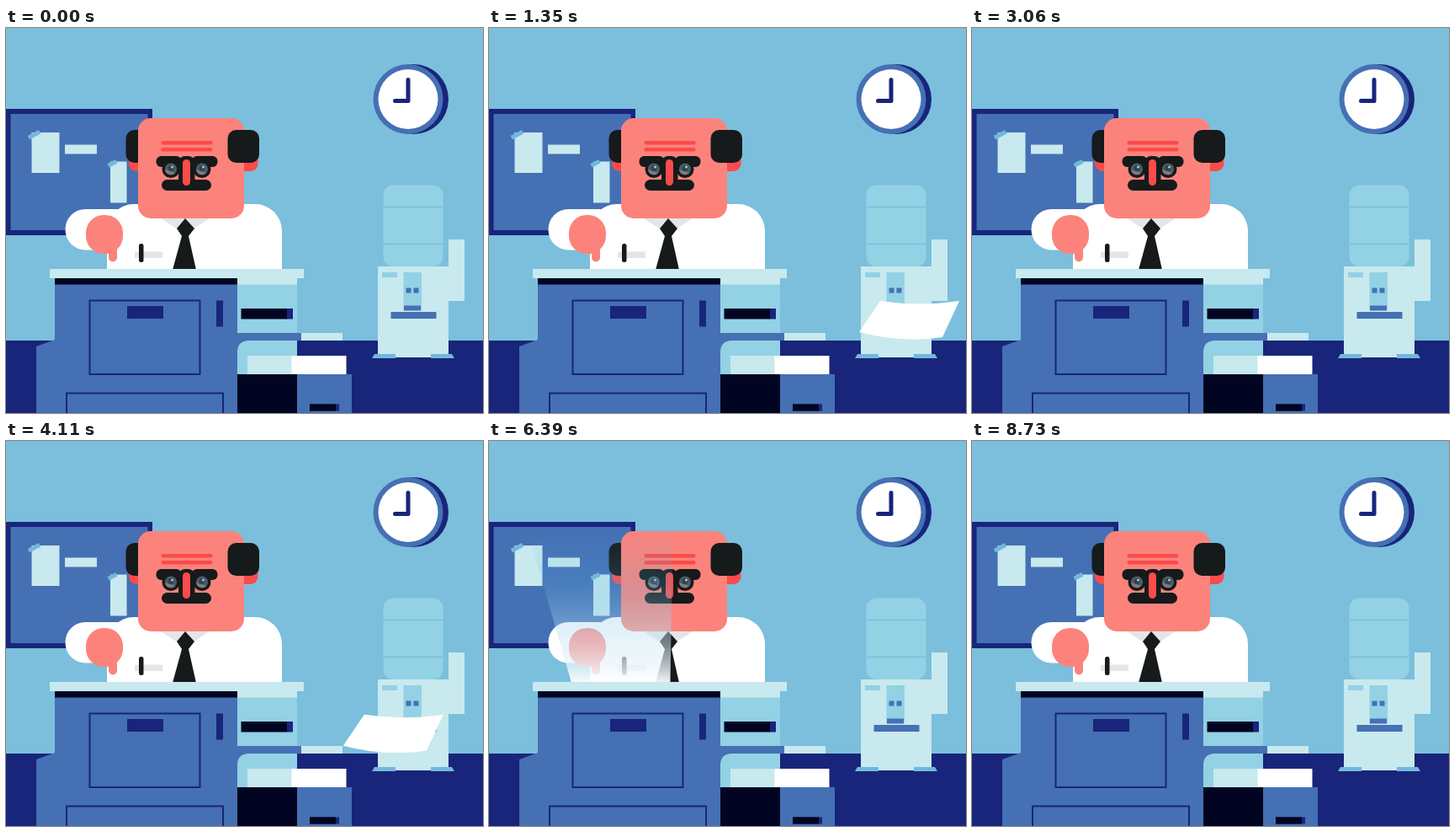
Animation of 567 by 457 pixels, one loop 8.97 s. Source, as an HTML page:

```html
<!DOCTYPE html>
<html lang="en">
<head>
<meta charset="utf-8">
<title>Copier</title>
<style>
  html, body { margin: 0; width: 100%; height: 100%; overflow: hidden; background: #7bbfdc; }
  svg { display: block; width: 100vw; height: 100vh; }
  .navy { fill: #18257a; }
  .blue { fill: #4570b4; }
  .sky { fill: #93d1e5; }
  .ice { fill: #c8e9ee; }
  .ink { fill: #161a1b; }
  .dark { fill: #020522; }
  .skin { fill: #fb837b; }
  .red { fill: #fb4b4b; }
  .tape { fill: #72b8dc; }
  .white { fill: #fff; }
  .line { fill: none; stroke: #18257a; stroke-width: 2; }
  .hands { fill: none; stroke: #18257a; stroke-width: 5; stroke-linecap: round; stroke-linejoin: round; }
</style>
</head>
<body>
<svg viewBox="0 0 567 457" preserveAspectRatio="none">
  <defs>
    <linearGradient id="glow" gradientUnits="userSpaceOnUse" x1="0" y1="55" x2="0" y2="287">
      <stop offset=".2" stop-color="#4fb0e0" stop-opacity="0"/>
      <stop offset=".5" stop-color="#5cb4e2" stop-opacity=".2"/>
      <stop offset=".8" stop-color="#d5eaf6" stop-opacity=".5"/>
      <stop offset="1" stop-color="#fff" stop-opacity=".95"/>
    </linearGradient>
    <clipPath id="slot"><rect x="351" width="216" height="457"/></clipPath>
  </defs>

  <rect width="567" height="457" fill="#7bbfdc"/>
  <rect class="navy" y="371" width="567" height="86"/>

  <!-- notice board -->
  <rect class="navy" y="96" width="174" height="150"/>
  <rect class="blue" x="5.5" y="102" width="163" height="138"/>
  <g class="ice">
    <rect x="30.500" y="124" width="33" height="48"/>
    <rect x="70" y="138.500" width="38" height="11"/>
    <rect x="124" y="158.500" width="19.500" height="49"/>
  </g>
  <g class="tape">
    <rect x="26" y="124.500" width="15" height="5" transform="rotate(-28 33 127)"/>
    <rect x="121" y="158.500" width="11" height="5" transform="rotate(-28 126 161)"/>
  </g>

  <!-- clock -->
  <rect class="navy" x="443.500" y="43" width="82.500" height="83" rx="41.500"/>
  <circle class="blue" cx="478" cy="84.500" r="41.500"/>
  <circle class="white" cx="478" cy="84.500" r="35.500"/>
  <path class="hands" d="M462.500 86.500H478V61.500"/>

  <!-- water cooler -->
  <rect class="sky" x="448.500" y="186.500" width="71" height="96.500" rx="12"/>
  <path d="M449 212.500h70M449 256.500h70" stroke="#7bbfdc" stroke-width="1.500"/>
  <path class="ice" d="M442 283h84v-32h19v73h-19v67h-84z"/>
  <path class="sky" d="M447 290h18v6h-18zM472.500 290h21.500v45h-21.500z"/>
  <path class="blue" d="M475.500 308.500h6v6h-6zM484.500 308.500h6v6h-6zM457.500 337h54v8h-54z"/>
  <rect class="blue" x="473" y="329.500" width="20" height="6"/>
  <path class="tape" d="M438 387h25v5h-28zM505 387h25l3 5h-28z"/>

  <!-- clerk -->
  <rect class="white" x="120" y="209" width="208" height="110" rx="32"/>
  <path d="M184 226h58l-20 13-9 2-9-2z" fill="#e5e5e8"/>
  <path class="ink" d="M213 226l11 12-7 9 9 40h-28l11-40-6-9z"/>
  <rect x="153" y="265.500" width="33" height="7.500" fill="#e5e5e8"/>
  <rect class="ink" x="158" y="256" width="5.500" height="22" rx="2.500"/>
  <rect class="red" x="146" y="148" width="30" height="22" rx="9"/>
  <rect class="red" x="270" y="148" width="29.500" height="22" rx="9"/>
  <rect class="ink" x="142.500" y="121" width="36" height="39" rx="10"/>
  <rect class="skin" x="157" y="107" width="126" height="119" rx="15"/>
  <rect class="ink" x="263.500" y="121" width="37.500" height="39" rx="10"/>
  <g class="red">
    <rect x="184.500" y="134" width="61" height="4.500" rx="2"/>
    <rect x="184.500" y="142" width="61" height="4.500" rx="2"/>
  </g>
  <g class="ink">
    <rect x="178.500" y="152" width="30" height="13" rx="6"/>
    <rect x="221" y="152" width="30.500" height="13" rx="6"/>
    <rect x="205" y="152" width="19.500" height="38" rx="8"/>
    <circle cx="196" cy="167.500" r="10.500"/>
    <circle cx="233" cy="167.500" r="10.500"/>
    <rect x="185" y="180" width="59" height="13" rx="6.500"/>
  </g>
  <g id="eye">
    <circle cx="196" cy="167.500" r="7" fill="#4b5d69"/>
    <path d="M189 168a7 7 0 0 0 12 4z" fill="#837a80"/>
    <circle cx="196" cy="166.500" r="3.500" fill="#33434d"/>
    <circle cx="197.500" cy="165" r="1.500" fill="#a9c8d5"/>
  </g>
  <use href="#eye" x="37"/>
  <rect class="red" x="210" y="156" width="9" height="31" rx="4.500"/>
  <rect class="white" x="70.500" y="215" width="85" height="48.500" rx="24"/>
  <rect class="skin" x="95" y="222" width="44" height="46" rx="21"/>
  <rect class="skin" x="122" y="250" width="10" height="27.500" rx="5"/>

  <path id="beam" fill="url(#glow)"/>

  <!-- copier -->
  <rect class="sky" x="275" y="297" width="71" height="114"/>
  <path class="blue" d="M36 457v-79l22-8v-73h217v65h76v9h-62q-14 0-14 14v72z"/>
  <rect class="dark" x="58" y="297" width="217" height="7.500"/>
  <rect class="ice" x="275" y="297" width="71" height="7.500"/>
  <rect class="ice" x="52" y="286" width="302" height="11"/>
  <rect class="line" x="99.500" y="323.500" width="131" height="87.500"/>
  <rect class="line" x="72" y="433.500" width="186" height="40"/>
  <path class="navy" d="M144 330h43v15h-43zM250 323.500h8v31h-8zM333 333h8v12.500h-8z"/>
  <rect class="dark" x="279.500" y="333" width="54.500" height="12.500"/>
  <rect class="ice" x="351" y="362" width="49" height="9"/>
  <rect class="ice" x="287" y="389" width="53" height="22"/>
  <rect class="white" x="339.500" y="389" width="65" height="22"/>
  <rect class="dark" x="275" y="411" width="71" height="46"/>
  <rect class="blue" x="346" y="411" width="65" height="46"/>
  <rect class="navy" x="361" y="446.500" width="35" height="8"/>
  <rect class="dark" x="361" y="446.500" width="31" height="8"/>

  <path id="sheet" class="white" d="M-36-20Q11-13 58-20L38 23Q-12 30-61 17z"/>
</svg>
<script>
const LOOP = 8970, CYCLE = 2850, COPIES = 3, EXIT = 1000, FREE = 1260;
const beam = document.getElementById('beam');
const sheet = document.getElementById('sheet');

// the sheet's centre where its swing turns round
const turns = [
  { t: EXIT, x: 308, y: 350 },
  { t: 1375, x: 503, y: 344 },
  { t: 2070, x: 354, y: 391 },
  { t: 2700, x: 478, y: 463 },
  { t: 3030, x: 450, y: 480 }
];

const clamp = (v, lo, hi) => Math.max(lo, Math.min(hi, v));
const ramp = (t, a, b) => clamp((t - a) / (b - a), 0, 1);
const mix = (a, b, u) => a + (b - a) * u;
const easeOut = u => Math.sin(u * Math.PI / 2);
const easeInOut = u => (1 - Math.cos(u * Math.PI)) / 2;
const copyIndex = t => clamp(Math.floor(t / CYCLE), 0, COPIES - 1);

function drawBeam(t) {
  const left = ramp(t, 830, 1240), right = ramp(t, 400, 950);
  const low = u => mix(98, 320, u), high = u => mix(31, 387, u);
  beam.setAttribute('d', right > left
    ? `M${low(left)} 287L${high(left)} 55H${high(right)}L${low(right)} 287z` : '');
}

function drawSheet(t) {
  const next = turns.findIndex(p => p.t > t);
  sheet.style.display = next > 0 ? '' : 'none';
  if (next < 1) return;
  const a = turns[next - 1], b = turns[next], u = ramp(t, a.t, b.t);
  const x = mix(a.x, b.x, easeInOut(u)), y = mix(a.y, b.y, easeOut(u));
  const unfold = mix(.15, 1, ramp(t, EXIT, FREE));
  sheet.setAttribute('transform', `translate(${x} ${y}) scale(1 ${unfold})`);
  // the clip lives in the sheet's own space, so hide the part still inside by its x
  document.querySelector('#slot rect').setAttribute('transform',
    `scale(1 ${1 / unfold}) translate(${-x} ${-y})`);
  sheet.setAttribute('clip-path', t < FREE ? 'url(#slot)' : 'none');
}

function frame() {
  const t = performance.now() % LOOP;
  drawBeam(t - CYCLE * copyIndex(t));
  drawSheet(t - CYCLE * copyIndex(t - EXIT));
  requestAnimationFrame(frame);
}
frame();
</script>
</body>
</html>
```
